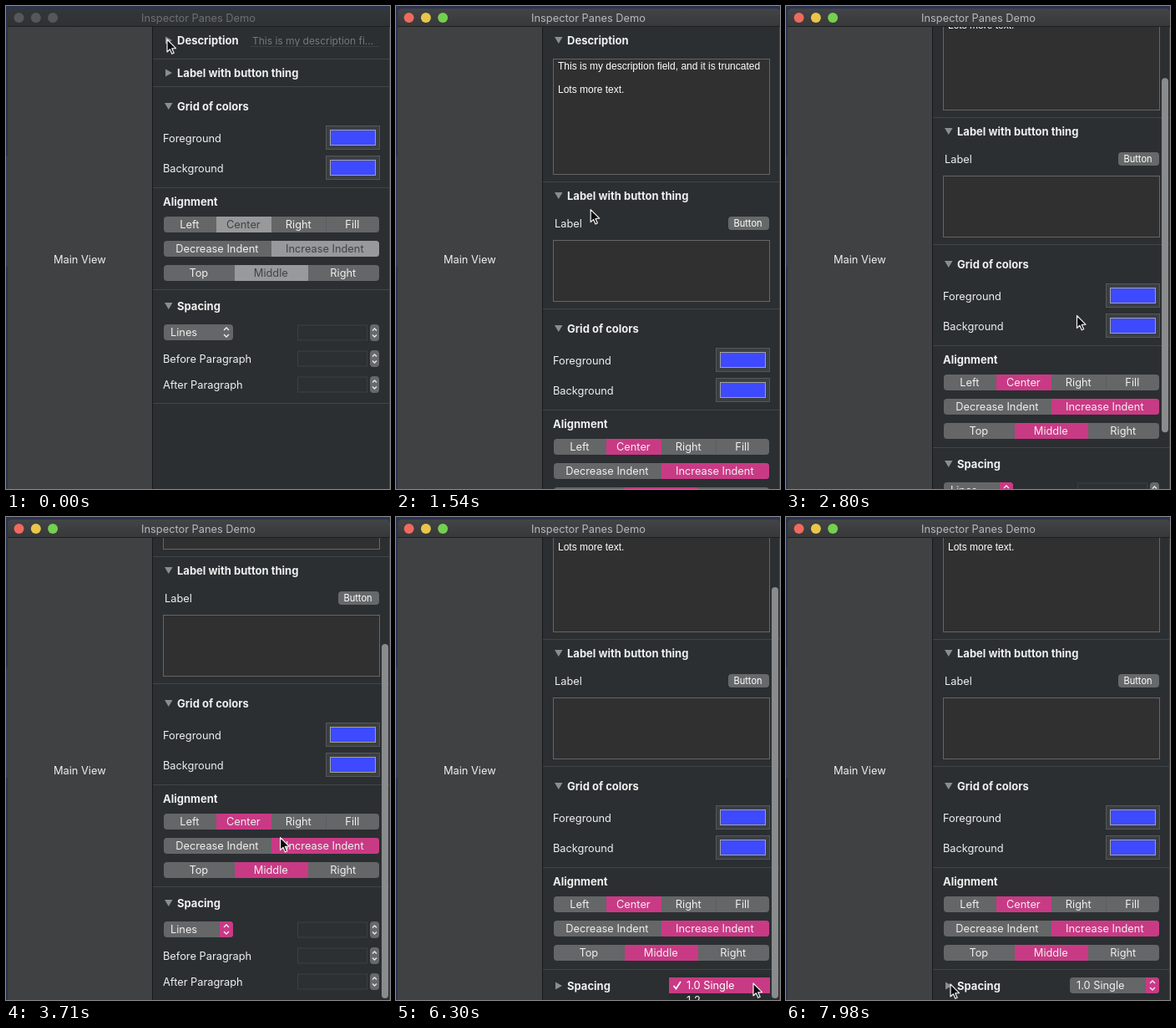
These frames come from a looping animation (460 px wide and 578 px high, 8000 ms). An HTML page with a canvas:

```html
<!DOCTYPE html>
<html lang="en">
<head>
<meta charset="utf-8">
<title>Inspector Panes Demo</title>
<style>
  html, body { margin: 0; width: 100%; height: 100%; overflow: hidden; background: #2b2f31; }
  canvas { display: block; width: 460px; height: 578px; }
</style>
</head>
<body>
<canvas id="stage" width="460" height="578"></canvas>
<script>
const ctx = document.getElementById('stage').getContext('2d');
const LOOP = 8000, STEP = 70;
const W = 460, H = 578, PANE_X = 176, PANE_TOP = 25;
const SANS = 'Inter, Roboto, sans-serif';
const REGULAR = `12.8px ${SANS}`, BOLD = `700 13px ${SANS}`, SMALL = `11.1px ${SANS}`;
const BODY = '12px "Liberation Sans", Arial, sans-serif';
const PINK = '#c93a85', GREY = '#646667', LIGHT = '#eff0f0';
const BOX_FILL = '#303030', BOX_EDGE = '#646667';
const OPEN_MS = 280, DESC_AT = 70, LABEL_AT = 1190, SPACE_AT = 4800;

// Pointer stops: time, x, y
const STOPS = [
  [0, 193, 40], [350, 193, 40], [560, 197, 87], [1000, 194, 227], [1300, 194, 227],
  [2000, 338, 288], [2250, 338, 288], [2550, 348.5, 370.5], [3500, 348.5, 370.5],
  [4400, 204, 465], [5150, 204, 465], [5750, 428, 558], [6750, 428, 558],
  [7500, 197, 559], [8000, 197, 559]
];

let active = true;

const clamp = v => Math.max(0, Math.min(1, v));
const ease = v => v * v * (3 - 2 * v);
const ramp = (t, from, to) => ease(clamp((t - from) / (to - from)));
const opacity = p => Math.sqrt(p);

function text(str, x, cy, font = REGULAR, color = LIGHT, align = 'left') {
  ctx.font = font;
  ctx.fillStyle = color;
  ctx.textAlign = align;
  ctx.fillText(str, x, cy + 4.5);
}

function rect(x, y, w, h, color) {
  ctx.fillStyle = color;
  ctx.fillRect(x, y, w, h);
}

function round(x, y, w, h, r, color) {
  ctx.beginPath();
  ctx.roundRect(x, y, w, h, r);
  ctx.fillStyle = color;
  ctx.fill();
}

function frame(x, y, w, h, fill, stroke) {
  rect(x, y, w, h, fill);
  ctx.strokeStyle = stroke;
  ctx.lineWidth = 1;
  ctx.strokeRect(x + 0.5, y + 0.5, w - 1, h - 1);
}

function shape(points, fill, stroke, width = 1) {
  ctx.beginPath();
  points.forEach(([x, y], i) => i ? ctx.lineTo(x, y) : ctx.moveTo(x, y));
  if (fill) {
    ctx.closePath();
    ctx.fillStyle = fill;
    ctx.fill();
  }
  if (stroke) {
    ctx.strokeStyle = stroke;
    ctx.lineWidth = width;
    ctx.stroke();
  }
}

function faded(alpha, top, bottom, draw) {
  if (alpha <= 0) return;
  ctx.save();
  ctx.globalAlpha = alpha;
  ctx.beginPath();
  ctx.rect(PANE_X, top, W - PANE_X, bottom - top);
  ctx.clip();
  draw();
  ctx.restore();
}

const separator = y => rect(PANE_X, Math.round(y), W - PANE_X, 1, '#414547');

function header(label, cy, open) {
  const tri = open
    ? [[190, cy - 4], [199.5, cy - 4], [194.75, cy + 4]]
    : [[191, cy - 4.5], [199, cy], [191, cy + 4.5]];
  shape(tri, '#8b8e8f');
  text(label, 205, cy, BOLD, LIGHT);
}

function chevrons(x, cy, size, color) {
  for (const dir of [-1, 1]) {
    shape([[x - size, cy + dir * 2.5], [x, cy + dir * (2.5 + size)], [x + size, cy + dir * 2.5]],
      null, color, 1.4);
  }
}

function segments(cy, edges, labels, selected) {
  const y = cy - 9.5, last = labels.length - 1;
  round(189, y, 258, 19, 4, GREY);
  labels.forEach((label, i) => {
    const x = edges[i], w = edges[i + 1] - x, on = i === selected;
    if (on) {
      const left = i === 0 ? 4 : 0, right = i === last ? 4 : 0;
      round(x, y, w, 19, [left, right, right, left], active ? PINK : '#97999a');
    } else if (i < last && i + 1 !== selected) {
      rect(x + w - 1, y + 1, 1, 17, '#5b5e60');
    }
    text(label, x + w / 2 - 0.7, cy, REGULAR, on && !active ? '#404345' : LIGHT, 'center');
  });
}

function popup(label, x, w, cy) {
  const y = cy - 9.5;
  round(x, y, w, 19, 4, GREY);
  if (active) round(x + w - 16, y, 16, 19, [0, 4, 4, 0], PINK);
  chevrons(x + w - 8, cy, 3, '#f0f0f0');
  text(label, x + 8, cy);
}

function numberField(cy) {
  frame(349, cy - 9, 84, 19, '#2d3032', '#3c4042');
  round(436, cy - 9.5, 11, 20, 4, '#66696a');
  chevrons(441.5, cy + 0.5, 2.5, '#e8e8e8');
}

function colorWell(y) {
  frame(383, y, 65, 29, '#3c3f41', '#555859');
  frame(388, y + 5, 55, 19, '#3d4aff', '#a3a392');
}

function description(y, p, open) {
  header('Description', y, open);
  faded(1 - opacity(p), y - 12, y + 12, () => {
    text('This is my description fi…', 295, y, `12px ${SANS}`, '#75797b');
    rect(293, y + 7, 154, 1, '#3c4042');
  });
  faded(opacity(p), y + 16, y + 22 + 147 * p, () => {
    frame(188, y + 22, 260, 139, BOX_FILL, BOX_EDGE);
    text('This is my description field, and it is truncated', 194, y + 30, BODY, '#fff');
    text('Lots more text.', 194, y + 58, BODY, '#fff');
  });
}

function labelPane(y, p, open) {
  separator(y - 17);
  header('Label with button thing', y, open);
  faded(opacity(p), y + 16, y + 16 + 119 * p, () => {
    text('Label', 190, y + 33);
    round(398, y + 25, 49, 16, 4, '#66696a');
    text('Button', 421.5, y + 32.5, SMALL, '#fff', 'center');
    frame(188, y + 53, 260, 74, BOX_FILL, BOX_EDGE);
  });
}

function colorsPane(y) {
  separator(y - 24);
  header('Grid of colors', y, true);
  text('Foreground', 188, y + 38);
  text('Background', 188, y + 74);
  colorWell(y + 23);
  colorWell(y + 59);
}

function alignmentPane(y) {
  separator(y - 17);
  text('Alignment', 188, y, BOLD, LIGHT);
  segments(y + 27.5, [189, 252, 318, 384, 447], ['Left', 'Center', 'Right', 'Fill'], 1);
  segments(y + 56.5, [189, 318, 447], ['Decrease Indent', 'Increase Indent'], 1);
  segments(y + 85.5, [189, 274, 362, 447], ['Top', 'Middle', 'Right'], 1);
}

function spacingPane(y, p, open, end) {
  separator(y - 20);
  header('Spacing', y, open);
  faded(1 - opacity(p), y - 12, y + 12, () => popup('1.0 Single', 340, 107, y - 0.5));
  faded(opacity(p), y + 16, end, () => {
    popup('Lines', 189, 83, y + 31.5);
    numberField(y + 31.5);
    text('Before Paragraph', 188, y + 63);
    numberField(y + 62.5);
    text('After Paragraph', 188, y + 94);
    numberField(y + 93.5);
  });
  separator(end);
}

function menu() {
  round(327, 547, 121, 60, 4, '#292c2e');
  rect(327, 551, 121, 19, PINK);
  shape([[332.5, 561], [335.5, 564.5], [341, 556]], null, '#fff', 1.7);
  text('1.0 Single', 348, 560.5, REGULAR, '#fff');
  text('1.2', 348, 578.5);
}

function chrome() {
  rect(0, 0, W, H, '#2a3350');
  rect(0, 180, 2, 132, '#343c5a');
  round(2, 3, 458, 600, [5, 5, 0, 0], '#404143');
  const bar = ctx.createLinearGradient(0, 3, 0, 25);
  bar.addColorStop(0, active ? '#434446' : '#34373a');
  bar.addColorStop(1, active ? '#37383a' : '#2f3234');
  round(2, 3, 458, 22, [5, 5, 0, 0], bar);
  rect(2, 24, 458, 1, '#1d1f20');
  const lights = active ? ['#ee6a5f', '#e9c64b', '#74d050'] : ['#55585b', '#55585b', '#55585b'];
  lights.forEach((color, i) => {
    ctx.beginPath();
    ctx.arc(15.5 + i * 20.3, 14, 6, 0, 7);
    ctx.fillStyle = color;
    ctx.fill();
  });
  text('Inspector Panes Demo', 230.5, 14.5, REGULAR, active ? '#b9babb' : '#6d7072', 'center');
  text('Main View', 88.3, 303, REGULAR, LIGHT, 'center');
  rect(175, PANE_TOP, 1, H, '#17191a');
  rect(PANE_X, PANE_TOP, W - PANE_X, H, '#2b2f31');
}

function scrollbar(scroll, content, alpha) {
  const view = H - PANE_TOP, track = view - 4;
  faded(alpha, PANE_TOP, H, () =>
    round(450, 27 + scroll / content * track, 8, view / content * track, 4, '#898b8c'));
}

function pointerAt(t) {
  const i = STOPS.findIndex(s => s[0] > t);
  const [t0, x0, y0] = STOPS[i - 1], [t1, x1, y1] = STOPS[i];
  const k = ramp(t, t0, t1);
  return [x0 + (x1 - x0) * k, y0 + (y1 - y0) * k];
}

function pointer(x, y, beam) {
  ctx.save();
  ctx.translate(x, y);
  ctx.lineJoin = 'round';
  if (beam) {
    for (const [color, width] of [['#fff', 3.6], ['#161616', 1.2]]) {
      shape([[-3.5, -7], [-1, -6.5], [0, -5], [0, 5], [-1, 6.5], [-3.5, 7]], null, color, width);
      shape([[3.5, -7], [1, -6.5], [0, -5], [0, 5], [1, 6.5], [3.5, 7]], null, color, width);
      shape([[-2, 2.5], [2, 2.5]], null, color, width);
    }
  } else {
    shape([[0, 0], [0, 15], [3.4, 11.8], [5.8, 17.3], [8.2, 16.2], [5.8, 10.9], [10.5, 10.6]],
      '#0b0b0b', '#f2f2f2', 1.2);
  }
  ctx.restore();
}

function draw(now) {
  const t = Math.floor(now % LOOP / STEP) * STEP;
  active = t >= STEP;

  const desc = ramp(t, DESC_AT, DESC_AT + OPEN_MS);
  const label = ramp(t, LABEL_AT, LABEL_AT + OPEN_MS);
  const space = 1 - ramp(t, SPACE_AT, SPACE_AT + OPEN_MS);

  const labelY = Math.round(80 + 147 * desc);
  const gridY = Math.round(labelY + 40 + 119 * label);
  const spaceY = gridY + 239;
  const end = spaceY + 17 + 99 * space;
  const limit = Math.max(0, end - H);
  const wheel = 163 * ramp(t, 2520, 3100);
  const scroll = Math.min(wheel, limit);

  chrome();
  ctx.save();
  ctx.beginPath();
  ctx.rect(PANE_X, PANE_TOP, W - PANE_X, H);
  ctx.clip();
  ctx.translate(0, -Math.round(scroll));
  description(41, desc, t >= DESC_AT);
  labelPane(labelY, label, t >= LABEL_AT);
  colorsPane(gridY);
  alignmentPane(gridY + 114);
  spacingPane(spaceY, space, t < SPACE_AT, end);
  ctx.restore();

  scrollbar(scroll, end - PANE_TOP, ramp(t, 2450, 2550) * (1 - ramp(t, 6900, 7150)));
  rect(459, PANE_TOP, 1, H, '#45494b');
  if (t >= 5880 && t < 6720) menu();

  const [x, y] = pointerAt(t), docY = y + scroll;
  const within = (top, bottom) => docY > top && docY < bottom;
  const inBox = x > 188 && x < 448 &&
    (desc > 0.9 && within(63, 202) || label > 0.9 && within(labelY + 53, labelY + 127));
  pointer(x, y, inBox);
}

function tick() {
  draw(performance.now());
  requestAnimationFrame(tick);
}
tick();
</script>
</body>
</html>
```
